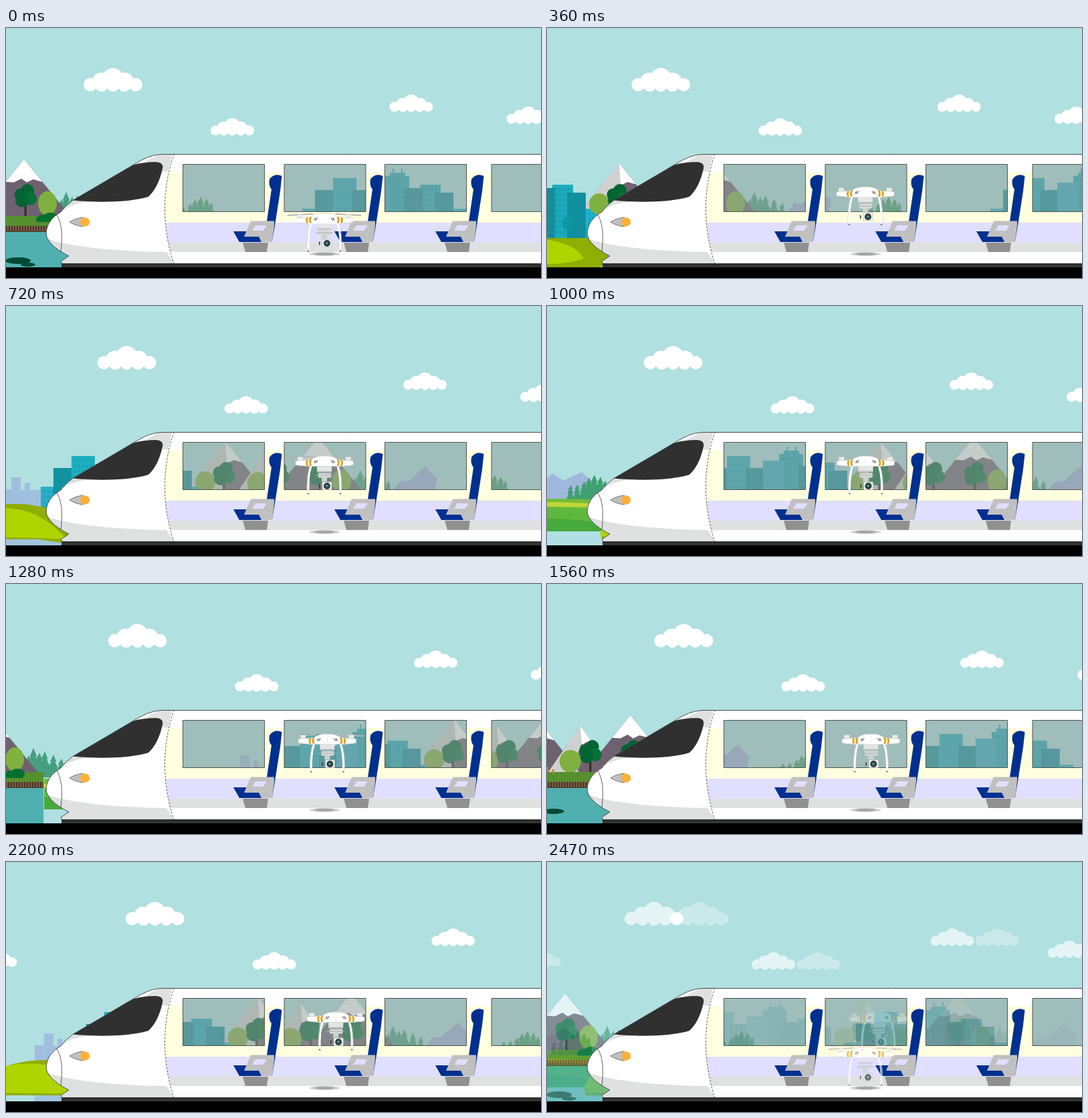
Write an HTML page with a canvas that moves like this. It is 800 px wide and 375 px high and loops after 2540 ms.

```html
<!DOCTYPE html>
<html lang="en">
<head>
<meta charset="utf-8">
<title>Train and drone</title>
<style>
html, body { margin: 0; width: 100%; height: 100%; overflow: hidden; background: #000; }
canvas { display: block; width: 800px; height: 375px; }
</style>
</head>
<body>
<canvas id="stage" width="800" height="375"></canvas>
<script>
const W = 800, H = 375, LOOP = 2540, STEP = 40, LAST = 59;
const PERIOD = 831, LAP = 34;
const stage = document.getElementById('stage').getContext('2d');
let c = stage;

function fill(color, d) { c.fillStyle = color; c.fill(new Path2D(d)); }
function line(color, width, d) {
  c.strokeStyle = color; c.lineWidth = width; c.stroke(new Path2D(d));
}
function rect(color, x, y, w, h) { c.fillStyle = color; c.fillRect(x, y, w, h); }
function oval(color, x, y, rx, ry = rx) {
  c.fillStyle = color;
  c.beginPath(); c.ellipse(x, y, rx, ry, 0, 0, 7); c.fill();
}
function at(x, y, scale, draw) {
  c.save(); c.translate(x, y); c.scale(scale, scale); draw(); c.restore();
}

// ---- sky ----
function cloud(x, y, scale) {
  at(x, y, scale, () => {
    c.fillStyle = '#fff';
    c.beginPath();
    for (const [dx, dy, r] of [[0, -2, 16], [18, 2, 13], [34, 7, 10], [17, 8, 9.5], [0, 8, 9.5]])
      for (const side of [-1, 1]) { c.moveTo(side * dx, dy); c.arc(side * dx, dy, r, 0, 7); }
    c.fill();
  });
}
function sky(drift) {
  rect('#b0e0e0', 0, 0, W, H);
  cloud(160 + drift, 78, 1);
  cloud(338.5 + drift, 148.5, .74);
  cloud(606 + drift, 113, .74);
  cloud(781 + drift, 131, .74);
  cloud(-78 + drift, 145, .72);
}

// ---- scenery ----
function pine(x, top, color) {
  const h = 290 - top;
  fill(color, `M${x} ${top}l${h * .12} ${h * .3}h-2l${h * .14} ${h * .3}h-2l${h * .16} ${h * .4}H${x - h * .34}l${h * .16} ${-h * .4}h-2l${h * .14} ${-h * .3}h-2z`);
}
function mountain(x, top, half, pale) {
  const h = 288 - top, cap = half * .37;
  fill('#6f6270', `M${x} ${top}L${x + half} 288H${x - half}z`);
  fill('#fff', `M${x} ${top}l${cap} ${h * .37}l${-cap * .5} ${-h * .04}l${-cap * .35} ${h * .05}l${-cap * .3} ${-h * .06}l${-cap * .4} ${h * .06}L${x - cap} ${top + h * .37}z`);
  if (pale) fill('#d0d1cf', `M${x} ${top}l2 ${h * .35}l-8 ${h * .3}L${x - 2} 288H${x - half}z`);
}
function lightTree(x, y, rx, ry) {
  rect('#5d6a2c', x - 1, y, 2, 23);
  oval('#80b040', x, y, rx, ry);
}
function darkTree(x) {
  rect('#3a2a20', x - 1.5, 252, 3, 32);
  for (const [dx, y, r] of [[3, 244, 10], [-7, 250, 9.5], [7, 256, 10], [-5, 259, 10]])
    oval(dx > 5 ? '#087038' : '#046434', x + dx, y, r);
}
function tower(x, w, top, color, lit) {
  rect(color, x, top, w, 320 - top);
  if (!lit) return;
  c.fillStyle = 'rgba(0,85,115,.15)';
  for (let y = top + 5; y < 312; y += 8)
    for (let dx = 4; dx < w - 4; dx += 6) c.fillRect(x + dx, y, 3, 4);
}
function city() {
  rect('#1fa8b8', 574, 217, 23, 8);
  rect('#1fa8b8', 578, 211, 2, 8);
  rect('#1fa8b8', 591, 211, 2, 8);
  tower(443, 24, 271, '#28aec8', true);
  tower(567, 36, 222, '#1fa8b8', true);
  tower(489, 35, 225, '#1fb0c0', true);
  tower(462, 27, 243, '#1293a2');
  tower(517, 27, 243, '#1292a2', true);
  tower(543, 31, 232, '#2fadc8');
  tower(619, 31, 235, '#1cabbc', true);
  tower(595, 28, 240, '#1290a0', true);
  tower(669, 20, 271, '#20b0d0', true);
  tower(641, 28, 247, '#108f9f');
  oval('#0b9a9f', 641, 293, 8, 9);
}
function hills() {
  rect('#a0c4dc', 385, 345, 315, 15);
  fill('#8fae00', 'M302 350C300 315 350 296 410 297C455 298 470 315 515 315H670Q695 320 705 350L690 359H500L440 350z');
  fill('#b0d400', 'M300 346C298 312 345 300 391 303C430 306 452 318 482 350Q430 347 391 347z');
  fill('#b0d400', 'M516 349C524 312 548 315 580 315C625 317 655 325 666 346Q640 355 590 355Q540 357 516 349z');
}
function fields() {
  rect('#b0e0e4', 106, 336, 240, 24);
  fill('#72bd38', 'M106 292Q200 286 330 292V338H106z');
  fill('#c4d638', 'M106 300Q210 288 330 300V304Q220 297 106 306z');
  fill('#5fb83e', 'M106 306Q210 298 330 308V338H106z');
  fill('#46aa3c', 'M106 320Q240 312 330 330V338H106z');
}
function lake() {
  rect('#568f2e', 688, 282, 248, 16);
  rect('#50b0b0', 688, 305, 248, 55);
  rect('#4b3528', 688, 297, 248, 9);
  c.fillStyle = '#8c6f52';
  for (let x = 689; x < 936; x += 4) c.fillRect(x, 297, 1.5, 8);
  oval('#034a35', 743, 341, 16, 4);
  oval('#034a35', 849, 349, 19, 5);
  oval('#034a35', 864, 355, 11, 3);
  line('#4b902a', 1.2, 'M735 297Q737 287 743 280M737 297L734 277M739 297Q743 288 746 287');
  line('#d87c28', 2.5, 'M734 282V275M741 284L743 278');
}
function farSide() {
  fill('#a0b8dc', 'M206 290L210 268L228 251L244 262L272 249L315 290z');
  for (const [x, w, top] of [[385, 14, 275], [399, 14, 257], [413, 6, 276], [419, 8, 265], [427, 20, 276]])
    rect('#a0bfdf', x, top, w, 90);
  mountain(719, 203, 68, true);
  mountain(858, 197, 74, false);
  mountain(783, 212, 52, true);
}
function lakeside() {
  lightTree(689, 264, 15, 16);
  darkTree(717);
  lightTree(768, 266, 16, 17);
  darkTree(798);
  darkTree(860);
  lightTree(893, 263, 14, 18);
  lake();
  oval('#047030', 887, 288, 11, 8);
  oval('#047030', 897, 285, 11, 8);
  rect('#568f2e', 875, 291, 40, 6);
}
// The leading strip ends with the city; only those after it have the lake.
function panorama(leading) {
  if (!leading) farSide();
  fill('#a0b0dc', 'M128 290L150 262L160 264L188 240L195 250L205 258L198 290z');
  for (const [x, top] of [[83, 257], [90, 246], [99, 253], [107, 251], [120, 256], [132, 262]])
    pine(x, top, '#46a080');
  for (const [x, top] of [[256, 269], [266, 268], [276, 263], [283, 257], [291, 253], [300, 256], [307, 262]])
    pine(x, top, '#40a070');
  fields();
  city();
  if (!leading) lakeside();
  hills();
}
function scenery(shift) {
  for (let lap = 0; lap < 3; lap++)
    at(shift - lap * PERIOD, 0, 1, () => panorama(lap === 0));
}

// ---- train ----
const BODY = 'M801 189.5H232Q214 190 190 205.5L100 258.5Q88 267 82 276C65 286 59 299 60.5 312C65 325 80 335 94 342L82 350L84 354H801z';
const PANES = [264.5, 416, 566.5, 726].map(x => `M${x} 204.5h122v71h-122z`).join('');

function seat(x) {
  at(x, 0, 1, () => {
    fill('#00308f', 'M394 227Q401 217 412.5 222L410 245L403 290L398 320H389L390 290L397 242Q392 236 394 227z');
    fill('#00308f', 'M340 305H398V321H349z');
    fill('#c0c0c0', 'M366 289.5H401V296H373L368 304H389V313H356z');
    fill('#c0c0c0', 'M378 313L390 296H401L398 321H382z');
    fill('#909090', 'M354 322H392L390 336H358z');
  });
}
function nose() {
  c.save();
  c.clip(new Path2D('M60 180H251Q224 270 251 354H50z'));
  rect('#fff', 50, 180, 210, 180);
  fill('#dfe1e0', 'M251 189H230L100 258L76 280Q95 262 126 261L234 215L244 216z');
  fill('#dfe1e0', 'M60 316C100 329 165 335 240 336L252 354H80z');
  c.restore();
  fill('#303030', 'M100 258.5L190 205.5Q204 201 225 201Q236 202 234 211Q228 239 213 253C185 262 135 262 100 258.5z');
  fill('#c0c0c0', 'M95 291Q104 285 116 284V298Q104 297 95 291z');
  line('#333', .6, 'M95 291Q104 285 116 284M95 291Q104 297 116 298');
  oval('#fbb03b', 118, 291, 7.3, 6.8);
  line('#222', .7, 'M76 280Q87 297 82 336');
  c.setLineDash([3, 2]);
  line('#333', .8, 'M251 189Q224 270 251 354');
  c.setLineDash([]);
}
function train() {
  c.save();
  c.clip(new Path2D(BODY + PANES), 'evenodd');
  rect('#fff', 50, 180, 750, 180);
  rect('#ffffe0', 235, 216, 565, 76);
  rect('#e0dfff', 235, 292, 565, 30);
  rect('#dfe1e0', 235, 322, 565, 14);
  nose();
  c.restore();
  fill('rgba(146,161,156,.54)', PANES);
  line('#333', .8, PANES);
  rect('#303534', 83, 353, 717, 6);
  line('#222', .8, BODY);
  [0, 151, 302].forEach(seat);
}

// ---- drone ----
function half(side, spin) {
  c.save();
  c.scale(side, 1);
  const blade = 4 + 15 * Math.abs(Math.cos(spin));
  line('#b4b6b4', 1.8, `M${36 - blade} -9.5L${36 + blade} -7.5`);
  fill('#e9eae9', 'M32 -9H40V4H32z');
  fill('#fff', 'M0 -10.5Q13 -11 20 -5L43 -3V3L25 5H0z');
  line('#c8c8c8', .7, 'M0 -10.5Q13 -11 20 -5L43 -3M43 3L25 5');
  line('#d9a52b', 3, 'M20 -5Q23 0 20 4M25 -4Q28 0 25 4');
  line('#555', 1.2, 'M10 -4L13 0M13 -4L15 0');
  line('#fff', 3, 'M20 5Q25 20 24 46');
  line('#cfd1d0', .6, 'M22 5Q27 20 26 46');
  oval('#333', 24, 46, 1);
  c.restore();
}
function drone(x, y, spin) {
  at(x, y, 1, () => {
    half(-1, spin);
    half(1, spin);
    rect('#e4e5e4', -11, 5, 22, 8);
    rect('#bfc2c0', -11, 12, 22, 2);
    rect('#d8dad9', -9, 15, 19, 7);
    rect('#b0b4b2', -13, 18, 26, 1.2);
    rect('#cfd1d0', -4, 21, 8, 7);
    rect('#f4f4f4', -3, 28.5, 14, 11.5);
    line('#b8b8b8', .7, 'M-3 28.5h14v11.5h-14z');
    rect('#333', -8, 32, 1.5, 5);
    oval('#353838', 4, 34.5, 5);
    oval('#18706c', 4, 34.5, 2.6);
    oval('#dff', 3.5, 34, .8);
  });
}

function scene(k) {
  // The strip rests for one step where its lap closes.
  const run = k > LAP ? k - 1 : k;
  sky(k * 1.14);
  scenery((run % LAP) * PERIOD / LAP);
  train();
  oval('rgba(120,120,120,.35)', 476.5, 339, 23, 3);
  oval('rgba(100,100,100,.4)', 476.5, 339, 15, 2);
  const rise = Math.min(k / 12, 1) * 53;
  drone(476 + Math.max(0, k - 24) * .555, 288.5 - rise, k * Math.PI / 2);
  rect('#000', 0, 359, W, 16);
}

// First picture, kept for the closing cross-fade.
const opening = document.createElement('canvas');
opening.width = W;
opening.height = H;
c = opening.getContext('2d');
scene(0);
c = stage;

function play() {
  const t = performance.now() % LOOP;
  scene(Math.min(Math.floor(t / STEP), LAST));
  if (t >= 2400) {
    c.globalAlpha = t < 2470 ? 1 / 3 : 2 / 3;
    c.drawImage(opening, 0, 0);
    c.globalAlpha = 1;
  }
  requestAnimationFrame(play);
}
play();
</script>
</body>
</html>
```
